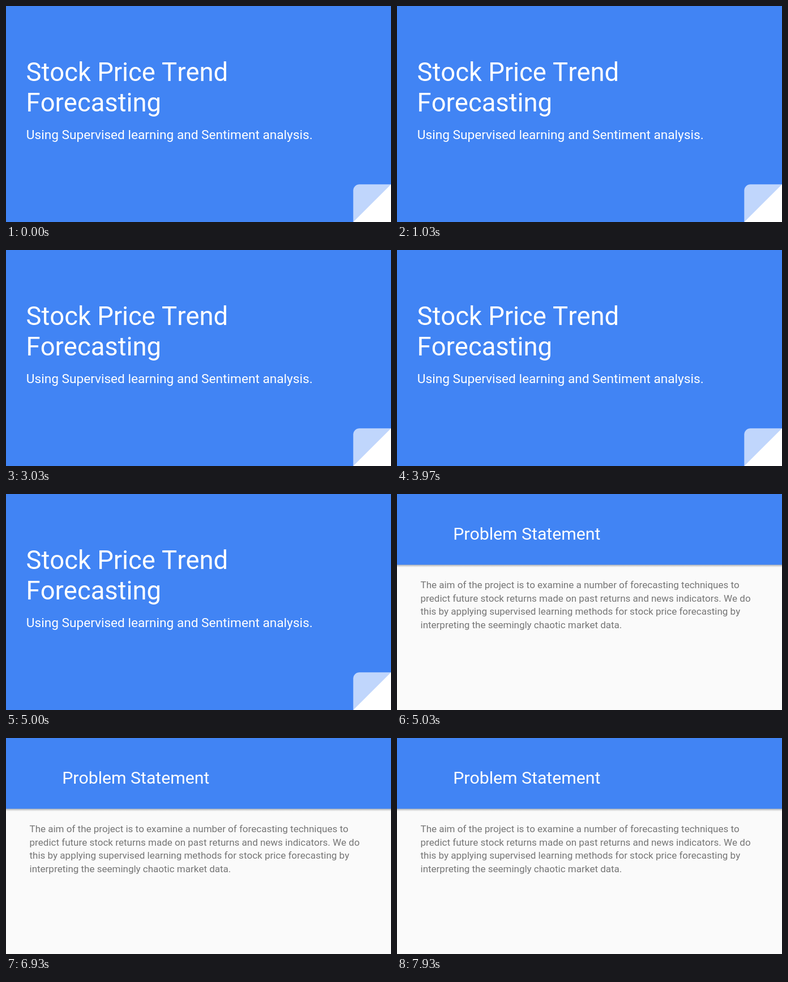
Animation, 680 px wide and 383 px high, one loop 8 s. Source, as an HTML page with a canvas:

```html
<!DOCTYPE html>
<html lang="en">
<head>
<meta charset="utf-8">
<title>Slides</title>
<style>
html, body { margin: 0; width: 100%; height: 100%; overflow: hidden; background: #4184f4; }
canvas { display: block; }
</style>
</head>
<body>
<canvas id="stage" width="680" height="383"></canvas>
<script>
const ctx = document.getElementById('stage').getContext('2d');
const LOOP = 8000, CUT = 5030;
const BLUE = '#4184f4';

function rect(x, y, w, h, fill) {
  ctx.fillStyle = fill;
  ctx.fillRect(x, y, w, h);
}

function lines(rows, x, y, size, step, fill) {
  ctx.font = `${size}px Roboto, sans-serif`;
  ctx.fontKerning = 'none';
  ctx.fillStyle = fill;
  rows.forEach((row, i) => ctx.fillText(row, x, y + i * step));
}

function foldedCorner() {
  ctx.fillStyle = '#c0d6fc';
  ctx.beginPath();
  ctx.roundRect(613.3, 316.2, 80, 80, 11);
  ctx.fill();
  ctx.fillStyle = '#fff';
  ctx.beginPath();
  ctx.moveTo(613.3, 383);
  ctx.lineTo(680, 316.2);
  ctx.lineTo(680, 383);
  ctx.fill();
}

function titleSlide() {
  rect(0, 0, 680, 383, BLUE);
  foldedCorner();
  lines(['Stock Price Trend', 'Forecasting'], 35.6, 133, 45.33, 54, '#fff');
  lines(['Using Supervised learning and Sentiment analysis.'], 35.8, 236, 22.67, 0, '#fff');
}

function problemSlide() {
  rect(0, 0, 680, 383, '#fafafa');
  const shade = ctx.createLinearGradient(0, 125, 0, 130);
  shade.addColorStop(0, 'rgba(0,0,0,.3)');
  shade.addColorStop(1, 'rgba(0,0,0,0)');
  rect(0, 125, 680, 5, shade);
  rect(0, 0, 680, 125.5, BLUE);
  lines(['Problem Statement'], 99.2, 81, 30.22, 0, '#fff');
  lines([
    'The aim of the project is to examine a number of forecasting techniques to',
    'predict future stock returns made on past returns and news indicators. We do',
    'this by applying supervised learning methods for stock price forecasting by',
    'interpreting the seemingly chaotic market data.'
  ], 41.5, 167, 17, 23.6, '#757575');
}

const start = performance.now();
function draw() {
  const t = (performance.now() - start) % LOOP;
  t < CUT ? titleSlide() : problemSlide();
  requestAnimationFrame(draw);
}
draw();
</script>
</body>
</html>
```
